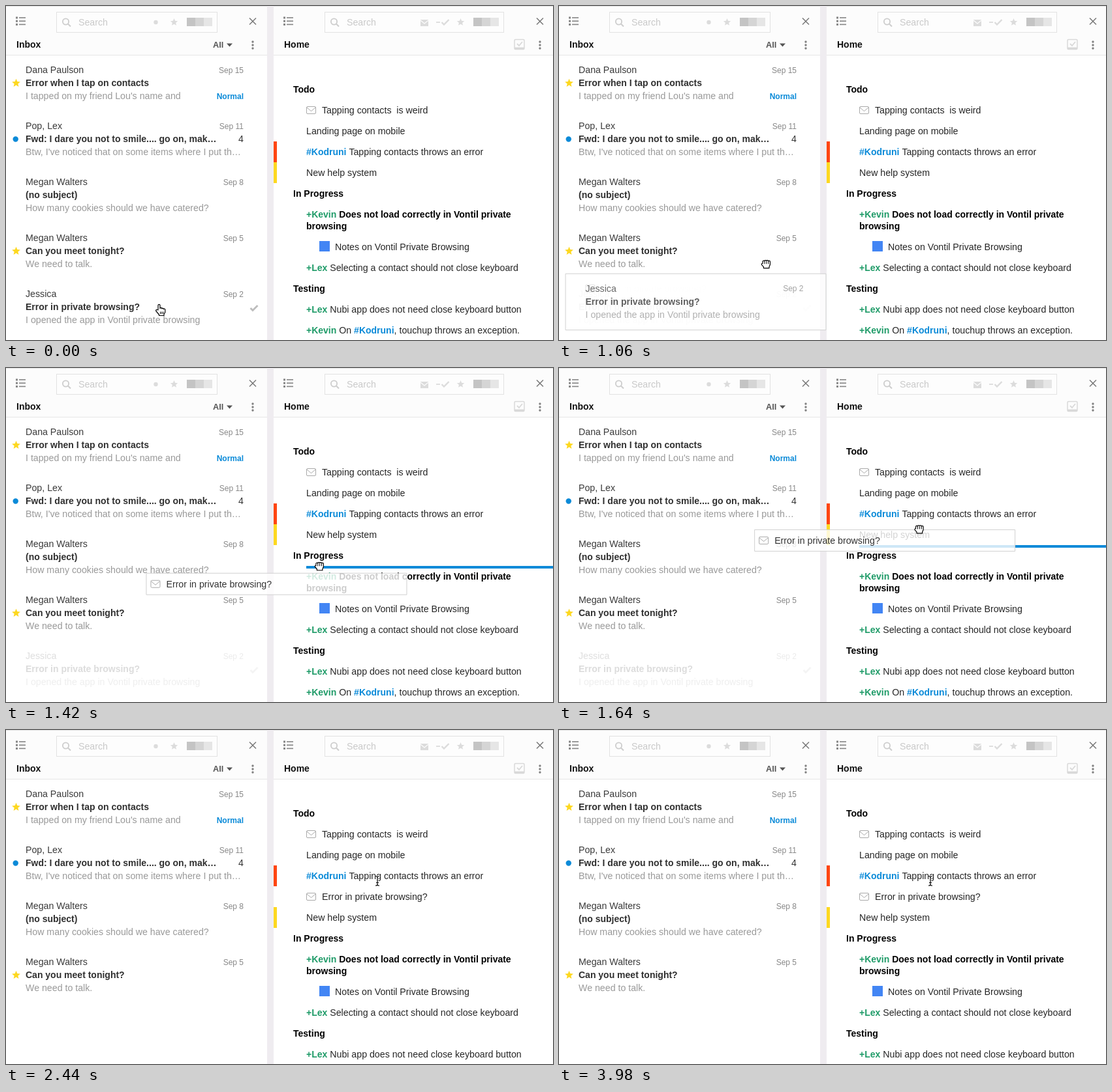
Recreate the animation shown at these times as an HTML page with a canvas. Size 838 px wide and 513 px high, loop 4 s.

```html
<!DOCTYPE html>
<html lang="en">
<head>
<meta charset="utf-8">
<title>Drag a message into a list</title>
<style>
html, body { margin: 0; width: 100%; height: 100%; overflow: hidden; background: #fff; }
canvas { display: block; width: 838px; height: 513px; }
</style>
</head>
<body>
<canvas id="stage"></canvas>
<script>
const W = 838, H = 513, LOOP = 4000;
const LIFT = 1040, DROP = 2400;
const canvas = document.getElementById('stage');
const dpr = window.devicePixelRatio || 1;
canvas.width = W * dpr;
canvas.height = H * dpr;
const c = canvas.getContext('2d');

const FACE = '"Liberation Sans", Arial, sans-serif';
const REG = '14.2px ' + FACE, BOLD = 'bold 14px ' + FACE;
const SMALL = '12px ' + FACE, SMALL_BOLD = 'bold 12px ' + FACE;
const BLUE = '#0a8ad8', GREEN = '#1f9b68', INK = '#262626', YELLOW = '#fdd820';

// keys: time, x, y
const POINTER = [[860, 236, 466], [1060, 317, 397], [1420, 480, 305], [1640, 552, 248], [2000, 569, 233]];
const CARD = [[1040, 0, 419], [1060, 9.5, 411.5], [1420, 214.5, 315.5], [1640, 299.5, 248.5], [2000, 330.5, 222.5], [2200, 333, 217]];
const SLOTS = [[1240, 352], [1360, 306], [1560, 274], [1740, 242]];

const MAILS = [
  { from: 'Dana Paulson', date: 'Sep 15', title: 'Error when I tap on contacts', text: "I tapped on my friend Lou's name and", star: true, tag: 'Normal' },
  { from: 'Pop, Lex', date: 'Sep 11', title: 'Fwd: I dare you not to smile.... go on, mak…', text: "Btw, I've noticed that on some items where I put th…", dot: true, count: '4' },
  { from: 'Megan Walters', date: 'Sep 8', title: '(no subject)', text: 'How many cookies should we have catered?' },
  { from: 'Megan Walters', date: 'Sep 5', title: 'Can you meet tonight?', text: 'We need to talk.', star: true },
  { from: 'Jessica', date: 'Sep 2', title: 'Error in private browsing?', text: 'I opened the app in Vontil private browsing', done: true }
];
const MOVED = MAILS[4];

function clamp(v) { return Math.max(0, Math.min(1, v)); }

// Monotone cubic through keys
function track(keys, t, k) {
  const last = keys.length - 1;
  if (t <= keys[0][0]) return keys[0][k];
  if (t >= keys[last][0]) return keys[last][k];
  let i = 0;
  while (t > keys[i + 1][0]) i++;
  const rate = j => (keys[j + 1][k] - keys[j][k]) / (keys[j + 1][0] - keys[j][0]);
  const slope = j => {
    if (j === 0) return rate(0);
    if (j === last) return 0;
    const a = rate(j - 1), b = rate(j);
    return a * b > 0 ? 2 * a * b / (a + b) : 0;
  };
  const d = keys[i + 1][0] - keys[i][0], u = (t - keys[i][0]) / d, v = 1 - u;
  return keys[i][k] * (1 + 2 * u) * v * v + keys[i + 1][k] * (3 - 2 * u) * u * u +
    d * u * v * (slope(i) * v - slope(i + 1) * u);
}

function text(s, x, y, font, color, align = 'left') {
  c.font = font;
  c.fillStyle = color;
  c.textAlign = align;
  c.fillText(s, x, y);
}

function runs(x, y, ...parts) {
  for (const [s, font, color] of parts) {
    text(s, x, y, font, color);
    x += c.measureText(s).width;
  }
}

function rect(x, y, w, h, color) {
  c.fillStyle = color;
  c.fillRect(x, y, w, h);
}

function line(points, color, width) {
  c.beginPath();
  points.forEach(([x, y]) => c.lineTo(x, y));
  c.strokeStyle = color;
  c.lineWidth = width;
  c.stroke();
}

function disc(x, y, r, color) {
  c.beginPath();
  c.arc(x, y, r, 0, Math.PI * 2);
  c.fillStyle = color;
  c.fill();
}

function star(x, y, r, color) {
  c.beginPath();
  for (let i = 0; i < 10; i++) {
    const a = i * Math.PI / 5 - Math.PI / 2, d = i % 2 ? r * 0.45 : r;
    c.lineTo(x + d * Math.cos(a), y + d * Math.sin(a));
  }
  c.closePath();
  c.fillStyle = color;
  c.fill();
}

function tick(x, y, color, width) {
  line([[x - 5.5, y], [x - 2, y + 3.5], [x + 5.5, y - 4]], color, width);
}

function envelope(x, y) {
  c.beginPath();
  c.roundRect(x + 0.5, y - 5.5, 14, 11, 1.5);
  c.strokeStyle = '#a9a9a9';
  c.lineWidth = 1;
  c.stroke();
  line([[x + 1, y - 4], [x + 7.5, y + 1.5], [x + 14, y - 4]], '#a9a9a9', 1);
}

function header(x, w, menuX, boxX, boxW, closeX) {
  rect(x, 0, w, 75, '#fcfcfc');
  rect(x, 75, w, 1, '#e6e6e6');
  rect(x, 0, w, 1, '#e4e4e4');
  for (let i = 0; i < 3; i++) {
    rect(menuX, 16.5 + i * 5.2, 3, 3, '#858585');
    rect(menuX + 5, 17.2 + i * 5.2, 10, 1.6, '#858585');
  }
  rect(boxX, 9, boxW, 32, '#e2e2e2');
  rect(boxX + 1, 10, boxW - 2, 30, '#fdfdfd');
  c.beginPath();
  c.arc(boxX + 14.5, 24, 4.6, 0, Math.PI * 2);
  c.strokeStyle = '#cdcdcd';
  c.lineWidth = 1.8;
  c.stroke();
  line([[boxX + 18, 27.5], [boxX + 22, 31.5]], '#cdcdcd', 2);
  text('Search', boxX + 34, 30, REG, '#c9c9c9');
  const right = boxX + boxW;
  star(right - 66.5, 25, 6, '#dcdcdc');
  rect(right - 47, 18, 13, 13, '#c4c4c4');
  rect(right - 34, 18, 13, 13, '#d5d5d5');
  rect(right - 21, 18, 13, 13, '#e6e6e6');
  line([[closeX - 5, 18.5], [closeX + 5, 28.5]], '#777', 1.5);
  line([[closeX + 5, 18.5], [closeX - 5, 28.5]], '#777', 1.5);
  for (let y = 55; y < 66; y += 5) disc(closeX, y, 1.7, '#808080');
}

function mailText(m, x, y) {
  text(m.from, x + 30, y + 18, REG, '#3a3a3a');
  text(m.title, x + 30, y + 38, BOLD, '#303030');
  text(m.text, x + 30, y + 58, REG, '#999');
  text(m.date, x + 364, y + 17.5, SMALL, '#888', 'right');
}

function mail(m, y) {
  mailText(m, 0, y);
  if (m.star) star(15.5, y + 33.5, 6.7, YELLOW);
  if (m.dot) disc(14.7, y + 33.5, 4.2, BLUE);
  if (m.tag) text(m.tag, 364, y + 58, SMALL_BOLD, BLUE, 'right');
  if (m.count) text(m.count, 364, y + 38, REG, '#333', 'right');
  if (m.done) tick(380, y + 35, '#bdbdbd', 2.8);
}

function inbox(t) {
  header(0, 400, 15, 77, 247, 378);
  disc(229.5, 25, 3.2, '#dcdcdc');
  text('Inbox', 16, 63.5, BOLD, '#111');
  text('All', 317, 63.5, 'bold 12.8px ' + FACE, '#555');
  c.beginPath();
  c.moveTo(338, 57.5);
  c.lineTo(347, 57.5);
  c.lineTo(342.5, 62.5);
  c.fillStyle = '#555';
  c.fill();
  MAILS.forEach((m, i) => {
    if (m === MOVED && t >= DROP) return;
    c.globalAlpha = m === MOVED && t >= LIFT ? 0.17 : 1;
    mail(m, 85 + i * 86);
  });
  c.globalAlpha = 1;
}

function home(t) {
  header(410, 428, 425, 488, 275, 818);
  rect(635, 21, 12, 10, '#dcdcdc');
  line([[635, 22], [641, 27], [647, 22]], '#fdfdfd', 1.2);
  line([[659, 25], [665, 25]], '#dcdcdc', 1.8);
  tick(673, 25, '#dcdcdc', 2.4);
  text('Home', 426, 63.5, BOLD, '#111');
  c.beginPath();
  c.roundRect(779, 51.5, 15, 15, 1.5);
  c.strokeStyle = '#d9d9d9';
  c.lineWidth = 1.5;
  c.stroke();
  rect(779, 63.5, 15, 3, '#d9d9d9');
  line([[783, 58], [786, 61], [791, 55]], '#d9d9d9', 1.8);

  const dropped = t >= DROP, s = dropped ? 32 : 0;
  const head = (label, y) => text(label, 440, y, BOLD, '#000');
  const task = (y, who, label) => runs(460, y, [who, BOLD, GREEN], [' ' + label, REG, INK]);

  rect(410, 208, 5, 32, '#ff4612');
  rect(410, 240 + s, 5, 32, YELLOW);
  head('Todo', 133);
  envelope(460, 160);
  text('Tapping contacts  is weird', 484, 165, REG, INK);
  text('Landing page on mobile', 460, 197, REG, INK);
  runs(460, 229, ['#Kodruni', BOLD, BLUE], [' Tapping contacts throws an error', REG, INK]);
  if (dropped) {
    envelope(460, 256);
    text(MOVED.title, 484, 261, REG, INK);
  }
  text('New help system', 460, 261 + s, REG, INK);
  head('In Progress', 293 + s);
  runs(460, 325 + s, ['+Kevin', BOLD, GREEN], [' Does not load correctly in Vontil private', BOLD, '#000']);
  text('browsing', 460, 343 + s, BOLD, '#000');
  rect(480, 361 + s, 16, 16, '#4285f4');
  text('Notes on Vontil Private Browsing', 504, 375 + s, REG, INK);
  task(407 + s, '+Lex', 'Selecting a contact should not close keyboard');
  head('Testing', 439 + s);
  task(471 + s, '+Lex', 'Nubi app does not need close keyboard button');
  runs(460, 503 + s, ['+Kevin', BOLD, GREEN], [' On ', REG, INK], ['#Kodruni', BOLD, BLUE], [', touchup throws an exception.', REG, INK]);
}

function dropLine(t) {
  if (t >= DROP) return;
  const slot = SLOTS.filter(s => t >= s[0]).pop();
  if (slot) rect(460, slot[1] - 2, 378, 4, BLUE);
}

function card(t) {
  if (t < LIFT || t >= DROP) return;
  const x = track(CARD, t, 1), y = track(CARD, t, 2);
  const p = clamp((t - 1050) / 190), q = p * p * (3 - 2 * p);
  c.save();
  c.beginPath();
  c.rect(x, y, 399, 87 - 54 * q);
  c.fillStyle = 'rgba(255,255,255,.8)';
  c.fill();
  c.strokeStyle = '#d0d0d0';
  c.lineWidth = 1;
  c.stroke();
  c.clip();
  c.globalAlpha = 0.78 * (1 - q);
  mailText(MOVED, x + 0.5, y + 9.5);
  c.globalAlpha = 0.3 + 0.7 * q;
  const dx = 24 * (1 - q), dy = 6 * (1 - q);
  envelope(x + 6.5 + dx, y + 16.5 + dy);
  c.globalAlpha = q;
  text(MOVED.title, x + 30.5 + dx, y + 21.5 + dy, REG, '#333');
  c.restore();
}

const HAND = new Path2D('M-3 1V-6.2a1.5 1.5 0 0 1 3 0V-1.5a1.4 1.4 0 0 1 2.7 0v.5a1.4 1.4 0 0 1 2.6.2v.6a1.3 1.3 0 0 1 2.5.3V4.5L6 7.5V9.5H-1.5V8L-6.2 2.5a1.5 1.5 0 0 1 2-2z');
const FIST = new Path2D('M-5-3.5a1.5 1.5 0 0 1 2.8-.8a1.6 1.6 0 0 1 3-.5a1.6 1.6 0 0 1 3 .5a1.5 1.5 0 0 1 2.7 1V1L5 4.5V6.5H-3.5V4.5L-6.3 1.5a1.5 1.5 0 0 1 1.3-2.4z');
const BEAM = new Path2D('M-3-7.5Q0-7.5 0-5.5Q0-7.5 3-7.5M0-5.5V5.5M-3 7Q0 7 0 5.5Q0 7 3 7M-2 2.5H2');

function pointer(t) {
  c.save();
  c.translate(track(POINTER, t, 1), track(POINTER, t, 2));
  c.lineJoin = 'round';
  if (t >= DROP) {
    c.translate(0, -1);
    c.strokeStyle = 'rgba(255,255,255,.9)';
    c.lineWidth = 3;
    c.stroke(BEAM);
    c.strokeStyle = '#000';
    c.lineWidth = 1.2;
    c.stroke(BEAM);
  } else {
    const held = t >= 860, shape = held ? FIST : HAND;
    if (held) c.translate(-0.5, -0.5);
    c.fillStyle = '#fff';
    c.fill(shape);
    c.strokeStyle = '#000';
    c.lineWidth = 1.2;
    c.stroke(shape);
    for (const x of held ? [-2.1, 0.8, 3.7] : [0.6, 2.8, 5]) {
      line(held ? [[x, -4], [x, 0]] : [[x, 3.5], [x, 7]], '#000', 1);
    }
  }
  c.restore();
}

function draw(t) {
  c.setTransform(dpr, 0, 0, dpr, 0, 0);
  rect(0, 0, W, H, '#fff');
  rect(400, 0, 10, H, '#efecf0');
  inbox(t);
  home(t);
  dropLine(t);
  card(t);
  pointer(t);
}

const start = performance.now();
function step(now) {
  draw(Math.max(0, now - start) % LOOP);
  requestAnimationFrame(step);
}
draw(0);
requestAnimationFrame(step);
</script>
</body>
</html>
```
